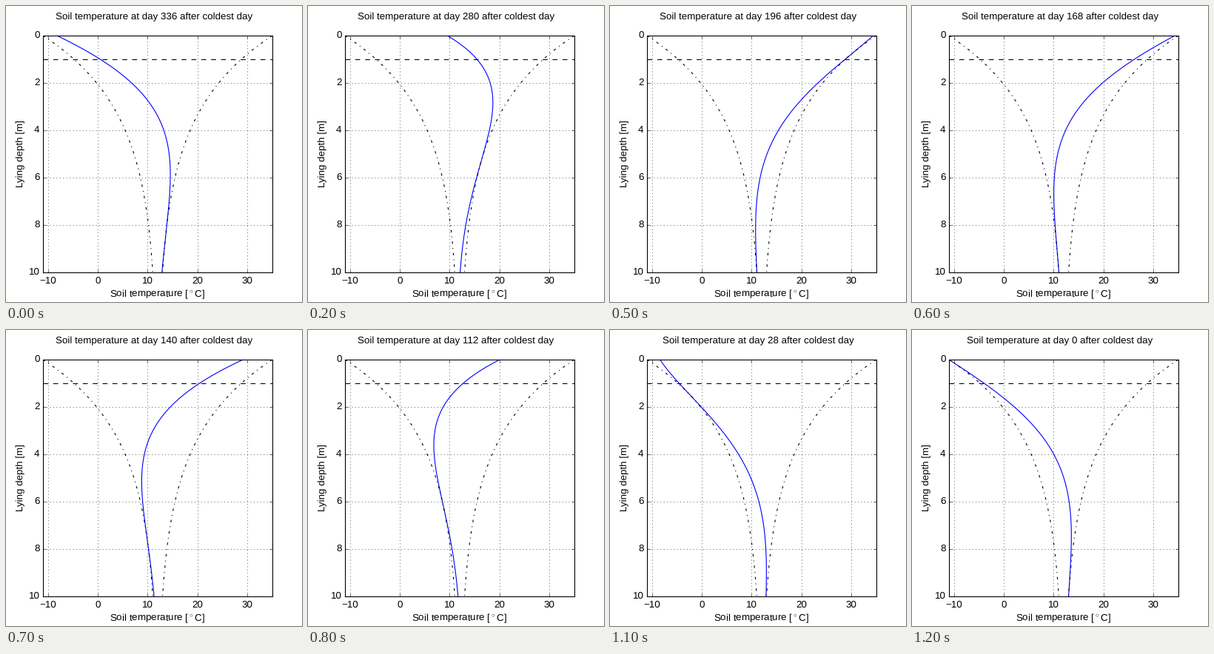
These frames come from a looping animation (400 px wide and 400 px high, 1300 ms). A matplotlib script:

```python
import numpy as np
import matplotlib.pyplot as plt
from matplotlib.animation import FuncAnimation

plt.style.use("classic")
plt.rcParams.update({
    "font.family": "Liberation Sans",
    "font.size": 12,
    "text.hinting": "none",
    "xtick.major.pad": 4.6,
    "figure.facecolor": "white",
    "savefig.facecolor": "white",
    "savefig.dpi": "figure",
})

MEAN, AMPLITUDE = 12.0, 23.0   # surface temperature, deg C
DAMPING = 3.17                 # damping depth, m
YEAR, STEP, FRAMES = 365, 28, 13

depth = np.linspace(0, 10, 201)
decay = AMPLITUDE * np.exp(-depth / DAMPING)


def soil_temperature(day):
    return MEAN - decay * np.cos(2 * np.pi * day / YEAR - depth / DAMPING)


fig, ax = plt.subplots(figsize=(5, 5), dpi=80)
fig.subplots_adjust(left=0.1248)
curve, = ax.plot([], [], "b-", lw=1)
for sign in (-1, 1):
    ax.plot(MEAN + sign * decay, depth, "k-.", lw=1)
ax.plot([-11, 35], [1, 1], "k--", lw=1)

ax.set_xlim(-11, 35)
ax.set_ylim(10, 0)
ax.set_xticks(range(-10, 31, 10))
ax.set_yticks(range(0, 11, 2))
ax.grid(True)
ax.set_xlabel(r"Soil temperature [$^\circ$C]", labelpad=4.6)
ax.set_ylabel("Lying depth [m]", labelpad=4)
title = fig.suptitle("", fontsize=12, y=0.979)


def update(i):
    day = STEP * (FRAMES - 1 - i)
    curve.set_data(soil_temperature(day), depth)
    title.set_text(f"Soil temperature at day {day} after coldest day")
    return curve, title


anim = FuncAnimation(fig, update, frames=FRAMES, interval=100,
                     repeat=True, repeat_delay=0, blit=False)
plt.show()
```
